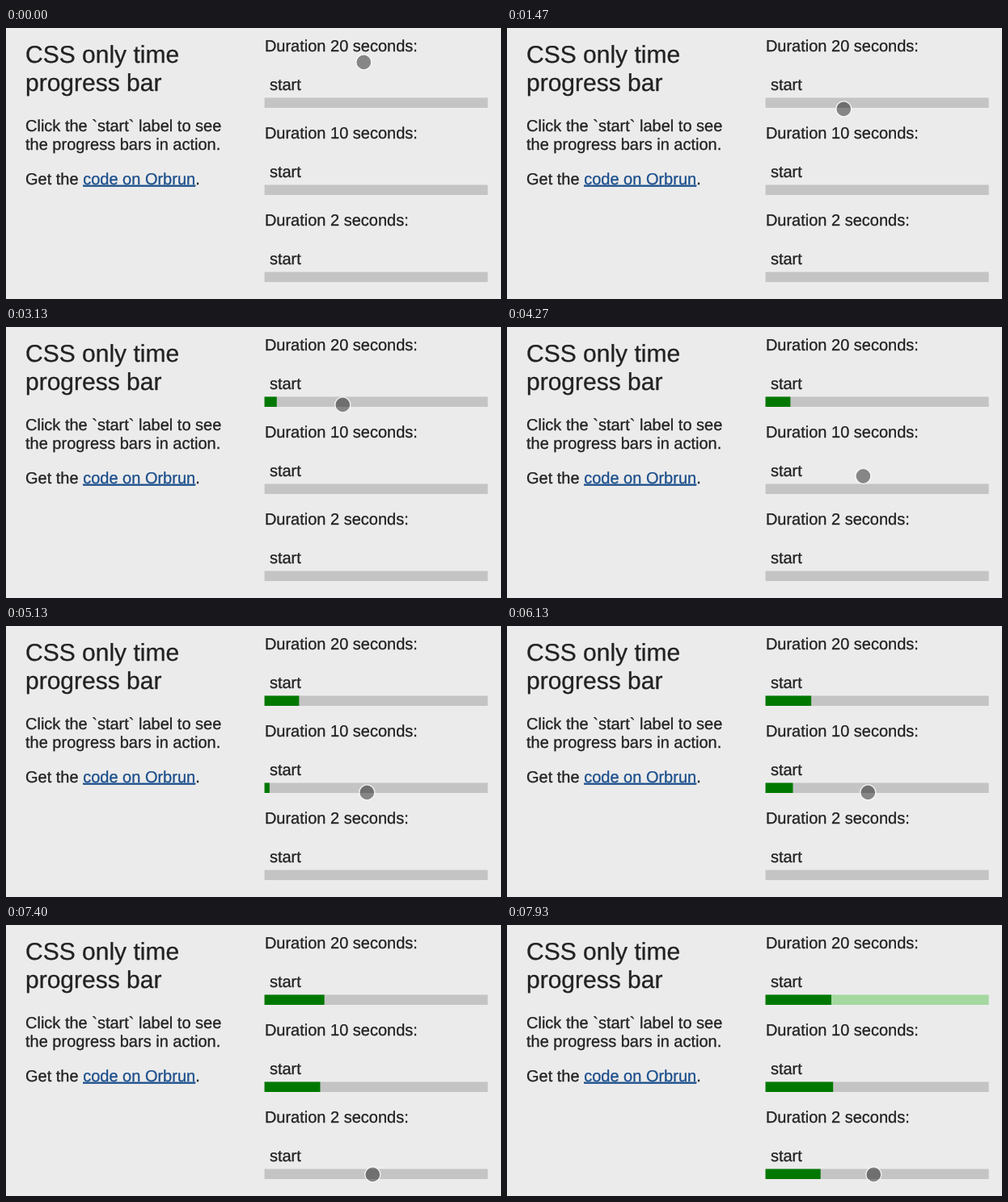
Write an HTML page that moves like this. It is 612 by 336 pixels and loops after 8000 ms.

```html
<!DOCTYPE html>
<html lang="en">
<head>
<meta charset="utf-8">
<title>CSS only time progress bar</title>
<style>
  html, body { margin: 0; width: 100%; height: 100%; overflow: hidden; background: #ebebeb; }
  svg { display: block; width: 612px; height: 336px; }
  text {
    font: 20px "Liberation Sans", Arial, sans-serif;
    fill: #222; stroke: #222; stroke-width: .3;
    white-space: pre; text-rendering: geometricPrecision;
  }
  .title { font-size: 30px; }
  .link { fill: #1c4f8c; stroke: #1c4f8c; text-decoration: underline; }
  .track { fill: #c4c4c4; }
  .fill { fill: #007800; }
  #cursor { fill: rgba(0, 0, 0, .43); stroke: rgba(255, 255, 255, .85); stroke-width: 1.4; }
</style>
</head>
<body>
<svg viewBox="0 0 612 336">
  <text class="title" x="24" y="43.2">CSS only time</text>
  <text class="title" x="24" y="78">progress bar</text>
  <text x="24" y="127.8">Click the `start` label to see</text>
  <text x="24" y="150.8">the progress bars in action.</text>
  <text x="24" y="193.8">Get the <tspan class="link">code on Orbrun</tspan>.</text>
  <g id="bars"></g>
  <circle id="cursor" r="9.5"/>
</svg>
<script>
const LOOP = 8000, FPS = 15, WIDTH = 276;

// seconds to fill, start time in ms
const bars = [[20, 2035], [10, 4905], [2, 7440]];

// cursor moves: begin, end, x, y
const moves = [
  [933, 1270, 417.3, 111],
  [1270, 1460, 416.3, 100.4],
  [1600, 1800, 416.3, 96.4],
  [3930, 4400, 446.3, 206.4],
  [6400, 6800, 453.3, 309.4],
];

const group = document.getElementById("bars");
const cursor = document.getElementById("cursor");

group.innerHTML = bars.map(([secs], i) => `
  <g transform="translate(319.6 ${i * 108})">
    <text x=".3" y="29">Duration ${secs} seconds:</text>
    <text x="6.3" y="77">start</text>
    <rect class="track" y="86.5" width="${WIDTH}" height="12.5"/>
    <rect class="fill" y="86.5" height="12.5"/>
  </g>`).join("");

const fills = group.querySelectorAll(".fill");
const firstTrack = group.querySelector(".track");

const clamp = v => Math.min(1, Math.max(0, v));
const ease = v => v * v * (3 - 2 * v);

function cursorAt(t) {
  let x = 442.3, y = 42.4;
  for (const [begin, end, toX, toY] of moves) {
    const k = ease(clamp((t - begin) / (end - begin)));
    x += (toX - x) * k;
    y += (toY - y) * k;
  }
  return [x, y];
}

function draw(now) {
  // the picture ticks at 15 steps per second
  const t = Math.floor((now % LOOP) * FPS / 1000 + 0.06) * 1000 / FPS;
  bars.forEach(([secs, start], i) =>
    fills[i].setAttribute("width", WIDTH * clamp((t - start) / (secs * 1000))));
  firstTrack.style.fill = t > bars[2][1] ? "#a5d8a0" : "";
  const [x, y] = cursorAt(t);
  cursor.setAttribute("cx", x);
  cursor.setAttribute("cy", y);
}

const origin = performance.now();
function tick() {
  draw(performance.now() - origin);
  requestAnimationFrame(tick);
}
tick();
</script>
</body>
</html>
```
